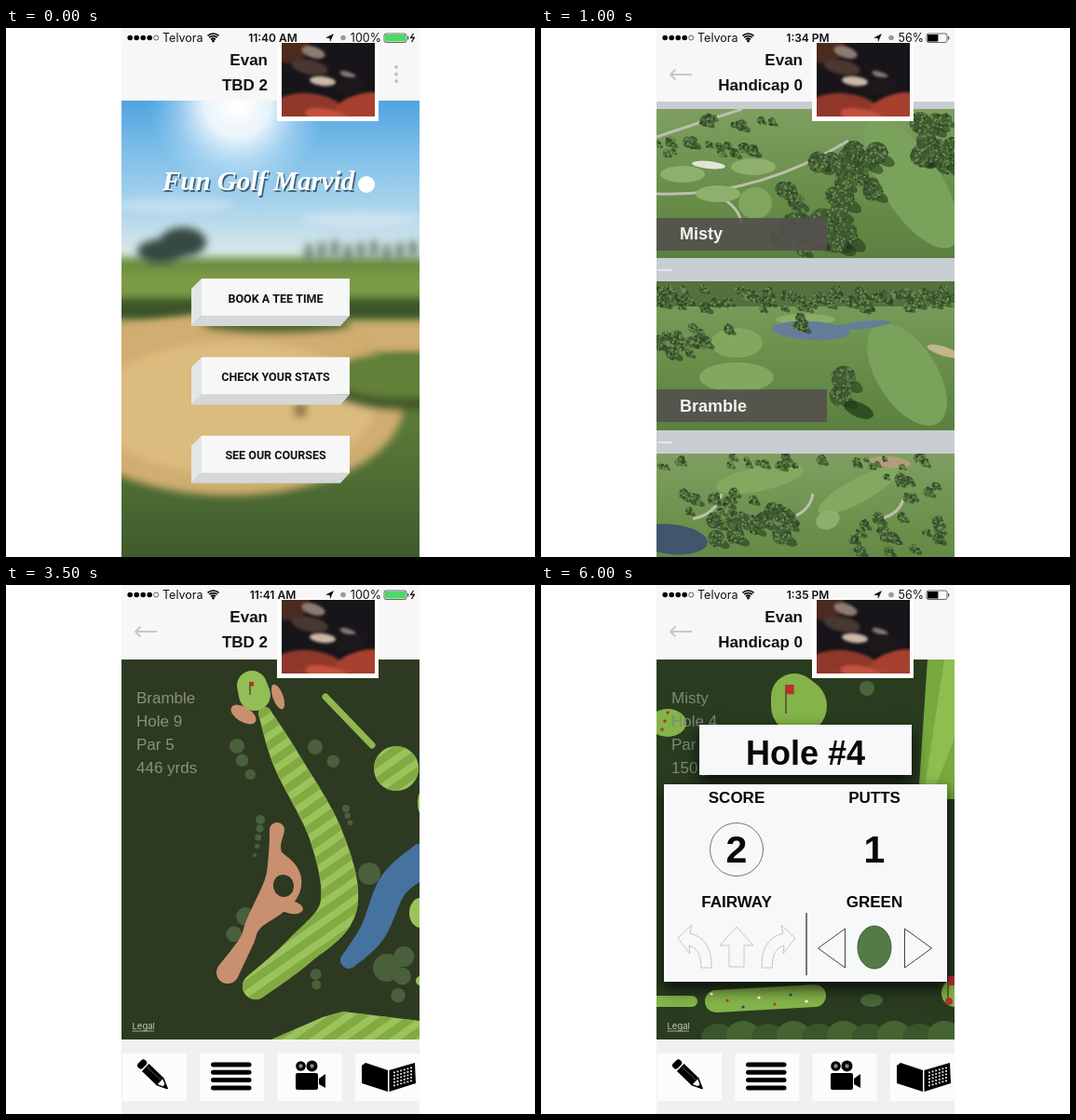
Animation, 568 px wide and 568 px high, one loop 8 s. Source, as an HTML page with a canvas:

```html
<!DOCTYPE html>
<html lang="en">
<head>
<meta charset="utf-8">
<title>Golf app tour</title>
<style>
html, body { margin: 0; width: 100%; height: 100%; overflow: hidden; background: #fff; }
canvas { display: block; width: 568px; height: 568px; }
</style>
</head>
<body>
<canvas id="stage" width="568" height="568"></canvas>
<script>
const SIZE = 568, LEFT = 124, WIDE = 320;
const SANS = '"Liberation Sans", Arial, sans-serif';
const UI = 'Inter, Roboto, sans-serif';
const BAR = '#f7f7f7', SAND = '#c99070', MAP = '#2d3a21', BUSH = '#4a5f3c';
const LIGHT = '#9cc35b', MOWN = '#82aa43', TURF = '#84b449', RED = '#b8322f';
const USER = 'Evan', CARRIER = 'Telvora', COURSES = ['Misty', 'Bramble'];
const stage = document.getElementById('stage').getContext('2d');
let c;

// ---- drawing helpers ----
function seeded(s) {
  return () => (s = (s * 16807) % 2147483647) / 2147483647;
}
function times(n, draw) {
  for (let i = 0; i < n; i++) draw(i);
}
function fill(color) {
  if (!color) return;
  c.fillStyle = color;
  c.fill();
}
function outline(color, width = 1) {
  c.strokeStyle = color;
  c.lineWidth = width;
  c.stroke();
}
function rect(x, y, w, h, color) { c.fillStyle = color; c.fillRect(x, y, w, h); }
function round(x, y, w, h, r, color) {
  c.beginPath();
  c.roundRect(x, y, w, h, r);
  fill(color);
}
function oval(x, y, rx, ry, color, rot = 0) {
  c.beginPath();
  c.ellipse(x, y, rx, ry, rot, 0, 7);
  fill(color);
}
function dot(x, y, r, color) { oval(x, y, r, r, color); }
function poly(p, color) {
  c.beginPath();
  for (let i = 0; i < p.length; i += 2) c.lineTo(p[i], p[i + 1]);
  c.closePath();
  fill(color);
}
function line(p, color, width = 1, cap = 'butt') {
  c.beginPath();
  for (let i = 0; i < p.length; i += 2) c.lineTo(p[i], p[i + 1]);
  c.lineCap = cap;
  c.lineJoin = 'round';
  outline(color, width);
}
function curve(x0, y0, cx, cy, x1, y1, color, width) {
  c.beginPath();
  c.moveTo(x0, y0);
  c.quadraticCurveTo(cx, cy, x1, y1);
  outline(color, width);
}
// Smooth band through key points [x, y, radius].
function ribbon(keys, color) {
  const key = i => keys[Math.max(0, Math.min(keys.length - 1, i))];
  c.beginPath();
  for (let u = 0; u <= keys.length - 1; u += 1 / 32) {
    const i = Math.floor(u), t = u - i;
    const [x, y, r] = key(i).map((b, d) => {
      const a = key(i - 1)[d], e = key(i + 1)[d], f = key(i + 2)[d];
      return b + t / 2 * (e - a + t * (2 * a - 5 * b + 4 * e - f + t * (3 * (b - e) + f - a)));
    });
    c.moveTo(x + r, y);
    c.arc(x, y, r, 0, 7);
  }
  fill(color);
}
// Fills the current path with diagonal mowing stripes.
function stripes() {
  c.save();
  fill(LIGHT);
  c.clip();
  times(45, i => line([100, i * 20, 500, i * 20 - 280], MOWN, 8.8));
  c.restore();
}
function text(s, x, y, font, color = '#111', align = 'left') {
  c.font = font;
  c.fillStyle = color;
  c.textAlign = align;
  c.fillText(s, x, y);
}
function inside(x, y, w, h, draw) {
  c.save();
  c.beginPath();
  c.rect(x, y, w, h);
  c.clip();
  draw();
  c.restore();
}
function ramp(y0, y1, ...colors) {
  const g = c.createLinearGradient(0, y0, 0, y1);
  colors.forEach((v, i) => g.addColorStop(i / (colors.length - 1), v));
  return g;
}

// ---- shared chrome ----
function statusBar(time, charge) {
  const full = charge === 100, arrow = full ? 348 : 362, bx = full ? 406 : 414, bw = full ? 24 : 22;
  times(4, i => dot(133.2 + i * 7, 10.5, 2.8, '#000'));
  dot(161.2, 10.5, 2.5);
  outline('#222', .7);
  text(CARRIER, 168, 15, '12.5px ' + UI);
  for (const r of [3.6, 6.4, 9]) {
    c.beginPath();
    c.arc(222.5, 15, r, -2.3, -.84);
    outline('#000', 1.7);
  }
  dot(222.5, 14, 1.4, '#000');
  text(time, 286.5, 15, '600 12px ' + UI, '#111', 'center');
  poly([arrow + 4, 6, arrow - 5, 10.5, arrow - .5, 11, arrow, 15], '#111');
  dot(arrow + 14, 10.5, 2.8, '#999');
  text(charge + '%', bx - 3, 15, '12.5px ' + UI, '#111', 'right');
  round(bx, 6, bw, 9.5, 2);
  outline('#444', .8);
  rect(bx + 1, 7, (bw - 2) * (full ? 1 : .57), 7.5, full ? '#4cd964' : '#000');
  rect(bx + bw + 1, 9, 1.3, 3.5, '#555');
  if (full) line([437.5, 6, 434.5, 10.5, 438.5, 10.2, 435.5, 15], '#111', 1.3);
}
function portrait(dx) {
  rect(291, 15, 109, 85, '#fff');
  inside(296, 16, 100, 79, () => {
    rect(296, 16, 100, 79, '#17151a');
    c.filter = 'blur(1.5px)';
    oval(304, 20, 22, 18, '#4c2a1e');
    oval(325, 98, 46, 28, '#8f382a', .1);
    oval(385, 88, 34, 18, '#a8402f', -.2);
    oval(345, 95, 24, 8, '#c4503d', .2);
    c.translate(dx, 0);
    oval(330, 26, 13, 6, '#8d7b72', .3);
    oval(326, 42, 20, 8, '#493732', .2);
    oval(340, 57, 14, 5, '#cbb9a6', .1);
    oval(367, 50, 9, 3, '#8b7972', .3);
    oval(370, 63, 16, 9, '#1d181c', -.2);
    c.filter = 'none';
  });
}
function header(time, charge, label, bottom, back = true) {
  rect(LEFT, 0, WIDE, bottom, BAR);
  statusBar(time, charge);
  text(USER, 281, 40, 'bold 17px ' + SANS, '#111', 'right');
  text(label, 281, 67, 'bold 17px ' + SANS, '#111', 'right');
  portrait(charge === 100 ? 0 : -3);
  if (back) {
    line([139, 50, 162, 50], '#c6c8ca', 2);
    line([144.5, 44.5, 139, 50, 144.5, 55.5], '#c6c8ca', 2);
  } else {
    times(3, i => dot(419, 42 + i * 7.5, 2, '#c4c4c4'));
  }
}
function pencil() {
  c.save();
  c.translate(158, 526);
  c.rotate(.77);
  round(-20, -5.5, 7, 11, 3, '#000');
  rect(-11.5, -5.5, 22, 11, '#000');
  line([-10, -1.7, 10, -1.7], '#777', .7);
  line([10, -5, 21, 0, 10, 5], '#000', 1.5);
  poly([16, -2.5, 22, 0, 16, 2.5], '#000');
  c.restore();
}
function movieCamera() {
  times(2, i => {
    dot(316.5 + i * 12, 516.5, 5.3 + i * .7, '#000');
    dot(316.5 + i * 12, 516.5, 2.2, '#888');
  });
  round(311, 524, 24, 18, 2, '#000');
  poly([336, 530, 343, 525, 343, 540, 336, 536], '#000');
}
function book() {
  poly([382, 516, 386, 513, 410, 521, 410, 544, 382, 535], '#000');
  poly([411.5, 521, 439, 513, 440, 535, 411.5, 544], '#000');
  times(30, i => rect(416 + i % 6 * 3.6, 522.5 + Math.floor(i / 6) * 3.5 - i % 6, 2, 1.8, '#ddd'));
}
function toolbar() {
  rect(LEFT, 488, WIDE, 80, '#f0f0f1');
  times(4, i => rect(125 + i * 83.3, 503, 69, 51, '#fcfcfc'));
  pencil();
  times(4, i => line([222.5, 515 + i * 8.3, 261, 515 + i * 8.3], '#000', 5, 'round'));
  movieCamera();
  book();
}
function holeInfo(color, ...lines) {
  lines.forEach((s, i) => text(s, 140, 127 + i * 25, '17px ' + SANS, color));
  text('Legal', 135.5, 477, '9.5px ' + UI, '#c3c8bd');
  line([135.5, 479, 159, 479], '#c3c8bd', .8);
}

// ---- home ----
function boxButton(y, label) {
  poly([210, y, 210, y + 40, 199, y + 51, 199, y + 11], '#e3e6e7');
  poly([210, y + 40, 369, y + 40, 359, y + 51, 199, y + 51], '#d3d8d9');
  rect(210, y, 159, 40, '#f8f7f8');
  text(label, 289.5, y + 25.5, '700 12.5px Roboto, sans-serif', '#111', 'center');
}
function scenery() {
  rect(LEFT, 78, WIDE, 172, ramp(78, 246, '#4fa4e0', '#7fbfe9', '#a9d3ec', '#dde9e8'));
  const sun = c.createRadialGradient(248, 82, 6, 248, 82, 95);
  ['#fff', 'rgba(255,255,255,.85)', 'rgba(235,246,255,.35)', 'rgba(200,230,255,0)']
    .forEach((v, i) => sun.addColorStop(i / 3, v));
  rect(LEFT, 78, WIDE, 172, sun);
  c.filter = 'blur(4px)';
  times(2, i => oval(180 + i * 200, 190 + i * 15, 65, 8, 'rgba(255,255,255,.28)'));
  rect(110, 246, 350, 340, ramp(246, 568, '#6f8f45', '#66883c', '#5c7d38', '#4e6d34', '#3f5b2b'));
  oval(165, 240, 24, 13, '#354941');
  oval(190, 230, 25, 16, '#354941');
  times(9, i => oval(325 + i * 14, 241 - i % 3 * 2, 4, 10, '#587060'));
  rect(110, 262, 350, 28, '#7c9b45');
  rect(110, 291, 350, 24, '#3b5429');
  rect(110, 314, 350, 36, '#d0ad70');
  oval(240, 404, 187, 98, '#d0ad70');
  oval(245, 408, 150, 72, '#dcbb7e');
  oval(290, 318, 80, 9, '#4a602f');
  oval(430, 382, 84, 28, '#405629');
  oval(430, 374, 84, 24, '#638139');
  oval(316, 410, 6, 8, '#816c45');
  c.filter = 'none';
}
function home() {
  inside(LEFT, 78, WIDE, 490, scenery);
  header('11:40 AM', 100, 'TBD 2', 78, false);
  const font = 'italic bold 29px "Liberation Serif", serif';
  text('Fun Golf Marvid', 169.5, 176, font, '#3d6076');
  text('Fun Golf Marvid', 168, 174, font, '#fff');
  dot(387, 168, 9, '#fff');
  ['BOOK A TEE TIME', 'CHECK YOUR STATS', 'SEE OUR COURSES']
    .forEach((s, i) => boxButton(269 + i * 84.4, s));
}

// ---- course list ----
function tree(x, y, r, rnd) {
  oval(x + r * .7, y + r * .6, r, r * .5, 'rgba(30,52,26,.55)', .5);
  dot(x, y, r, '#3f5b31');
  times(r * 4, () => {
    const a = rnd() * 7, d = Math.sqrt(rnd()) * r;
    dot(x + Math.cos(a) * d, y + Math.sin(a) * d, 1.2, ['#2f4826', '#557340', '#6f8d53'][Math.floor(rnd() * 3)]);
  });
}
function grove(x, y, w, h, n, r, rnd) {
  const spots = Array.from({ length: n }, () => [x + rnd() * w, y + rnd() * h, r * (.6 + rnd() * .7)]);
  spots.sort((a, b) => a[1] - b[1]).forEach(s => tree(...s, rnd));
}
function path(...p) { curve(...p, '#bdbfae', 3); }
const photos = [
  (y, rnd) => {
    path(124, y + 30, 165, y + 16, 216, y);
    path(124, y + 91, 230, y + 95, 330, y + 34);
    path(190, y + 93, 213, y + 105, 215, y + 123);
    oval(398, y + 80, 80, 32, '#7ba25b', 1);
    times(3, i => oval(152 + i * 38, y + 70 + i % 2 * 25 - i * 4, 24, 9, '#8eb06c'));
    oval(230, y + 101, 18, 17, '#7fa55f');
    oval(180, y + 60, 18, 4, '#e2e4d8', .1);
    grove(125, y + 35, 105, 18, 14, 5, rnd);
    grove(170, y + 8, 100, 10, 7, 5, rnd);
    grove(296, y + 40, 66, 52, 18, 10, rnd);
    grove(398, y + 8, 46, 52, 18, 10, rnd);
    grove(250, y + 82, 75, 75, 24, 12, rnd);
  },
  (y, rnd) => {
    rect(LEFT, y, WIDE, 27, '#55703f');
    grove(LEFT, y + 8, WIDE, 22, 80, 5, rnd);
    times(2, i => oval(210, y + 66 + i * 37, 28 + i * 12, 16, '#82a85f'));
    oval(284, y + 41, 32, 6, '#8aad66');
    oval(393, y + 100, 62, 32, '#7ba25b', 1);
    oval(290, y + 53, 42, 10, '#647d99', .05);
    oval(345, y + 47, 30, 4, '#647d99', -.1);
    oval(432, y + 75, 18, 5, '#c2b58c', .3);
    grove(126, y + 46, 50, 38, 13, 6, rnd);
    grove(200, y + 36, 130, 16, 4, 6, rnd);
    grove(318, y + 84, 10, 42, 4, 10, rnd);
    oval(341, y + 138, 17, 8, 'rgba(28,58,22,.7)', .4);
  },
  (y, rnd) => {
    times(2, i => oval(235 + i * 105, y + 27 + i * 13, 48, 13, '#82a95f', -.2 - i * .3));
    oval(308, y + 71, 13, 10, '#8cb06c', -.4);
    oval(375, y + 9, 22, 6, '#b39c7b', .1);
    times(3, i => path(163 + i * 100, y + 70, 188 + i * 100, y + 65, 194 + i * 98, y + 43));
    oval(140, y + 92, 39, 16, '#3f566c', .1);
    grove(LEFT, y + 3, WIDE, 12, 28, 4, rnd);
    grove(150, y + 40, 110, 30, 16, 5, rnd);
    grove(180, y + 60, 105, 40, 14, 8, rnd);
    grove(330, y + 20, 110, 85, 24, 5, rnd);
  }
];
function courses() {
  rect(LEFT, 79, WIDE, 489, '#c8cdd1');
  photos.forEach((draw, i) => {
    const y = 87 + i * 185;
    inside(LEFT, y, WIDE, 160, () => {
      rect(LEFT, y, WIDE, 160, ramp(y, y + 160, '#7e9f60', '#6a904b', '#5b8040'));
      draw(y, seeded(77 + i * 900));
    });
    if (i > 1) return;
    rect(LEFT, y + 117 - i, 183, 35, 'rgba(84,79,78,.88)');
    text(COURSES[i], 149, y + 140, 'bold 18px ' + SANS, '#f2f2f2');
    line([125, y + 173, 141, y + 173], '#eef0f1', 1.5);
  });
  header('1:34 PM', 56, 'Handicap 0', 79);
}

// ---- hole map ----
function flag(x, y, h) {
  line([x, y, x, y + h], '#4e3b26', 1.3);
  rect(x, y, h * .28, h * .33, RED);
}
function bushes(x, y, slope, n, r, rnd) {
  times(n, i => dot(x + i * slope + (rnd() - .5) * r, y + i * r * 1.9, r * (1 - i * .15), BUSH));
}
function layout() {
  const rnd = seeded(9);
  rect(LEFT, 80, WIDE, 408, MAP);
  bushes(252, 173, 4, 3, 8, rnd);
  bushes(335, 174, 14, 2, 8, rnd);
  bushes(363, 240, 4, 3, 4, rnd);
  bushes(275, 252, -2, 5, 5, rnd);
  bushes(259, 356, -14, 2, 10, rnd);
  bushes(331, 418, 5, 2, 6, rnd);
  bushes(432, 399, -6, 3, 11, rnd);
  dot(409, 411, 15, BUSH);
  dot(390, 310, 12, BUSH);
  ribbon([[278, 138, 7], [302, 190, 15], [344, 270, 18], [357, 345, 20], [316, 392, 17], [268, 431, 14]]);
  stripes();
  ribbon([[264, 108, 16], [267, 118, 17]], '#91be55');
  flag(262, 104, 14);
  oval(255, 139, 15, 8, SAND, .55);
  oval(292, 120, 5.5, 14, SAND, -.35);
  ribbon([[291, 263, 8], [289, 288, 7], [297, 322, 20], [267, 362, 9], [258, 383, 8], [238, 416, 12]], SAND);
  oval(306, 346, 13, 7, SAND, .2);
  oval(298, 323, 11, 12, MAP, -.3);
  line([343, 120, 393, 172], '#91b850', 7, 'round');
  dot(419, 197, 24);
  stripes();
  ribbon([[448, 295, 18], [416, 322, 16], [394, 372, 14], [368, 403, 9]], '#4672a0');
  times(3, i => oval(445, [234, 352, 425][i], [3, 12, 5][i], [11, 16, 5][i], LIGHT));
  poly([283, 489, 340, 464, 362, 458, 444, 468, 444, 489]);
  stripes();
}
function hole() {
  inside(LEFT, 80, WIDE, 408, layout);
  header('11:41 AM', 100, 'TBD 2', 80);
  holeInfo('#89917f', COURSES[1], 'Hole 9', 'Par 5', '446 yrds');
  toolbar();
}

// ---- score card ----
function card(x, y, w, h) {
  c.save();
  c.shadowColor = 'rgba(0,0,0,.8)';
  c.shadowBlur = 16;
  c.shadowOffsetY = 7;
  rect(x, y, w, h, '#f7f8fa');
  c.restore();
}
function bentArrow(side) {
  c.save();
  c.translate(210, 0);
  c.scale(side, 1);
  c.beginPath();
  c.moveTo(-63, 379);
  c.lineTo(-48, 365);
  c.lineTo(-50, 374);
  c.quadraticCurveTo(-26, 380, -27, 411);
  c.lineTo(-38, 411);
  c.quadraticCurveTo(-38, 390, -51, 387);
  c.lineTo(-50, 396);
  c.closePath();
  outline('#c6c6c6');
  c.restore();
}
function greenside() {
  rect(LEFT, 80, WIDE, 408, '#2a3c20');
  poly([415, 80, 444, 80, 444, 230, 405, 230], '#78a93f');
  poly([433, 80, 444, 80, 444, 165, 418, 230, 410, 230], '#8fbd4f');
  ribbon([[272, 120, 25], [277, 130, 30]], TURF);
  flag(263, 107, 31);
  dot(350, 111, 8, '#48663a');
  oval(136, 148, 20, 15, TURF);
  times(3, i => dot(136 - i * 3, 137 + i * 9, 1.8, RED));
  times(10, i => oval(190 + i * 27, 486 - i % 2 * 3, 18, 15, i % 2 ? '#45642f' : '#3b562a'));
  oval(355, 446, 12, 7, '#48663a');
  line([110, 447, 162, 447], TURF, 12, 'round');
  line([188, 447, 294, 441], TURF, 24, 'round');
  times(7, i => dot(183 + i * 17, 439 + i * 7 % 17, 1.6, ['#fff', RED, '#33475e'][i % 3]));
  oval(444, 438, 14, 15, TURF);
  flag(437, 420, 30);
  dot(438, 447, 4, RED);
}
function score() {
  inside(LEFT, 80, WIDE, 408, greenside);
  header('1:35 PM', 56, 'Handicap 0', 80);
  holeInfo('#7d8a73', COURSES[0], 'Hole 4', 'Par 3', '150 yrds');
  inside(LEFT, 100, WIDE, 388, () => {
    card(170, 150, 228, 54);
    card(132, 214, 304, 212);
  });
  const bold = (s, x, y, px) => text(s, x, y, `bold ${px}px ${SANS}`, '#080808', 'center');
  bold('Hole #4', 284, 193, 36);
  [['SCORE', '2', 'FAIRWAY'], ['PUTTS', '1', 'GREEN']].forEach(([top, value, below], i) => {
    const x = 210 + i * 148;
    bold(top, x, 234, 17);
    bold(value, x, 298, 41);
    bold(below, x, 346, 17);
  });
  dot(210, 284, 28.5);
  outline('#777');
  bentArrow(1);
  bentArrow(-1);
  poly([210, 367, 228, 387, 218, 387, 218, 410, 202, 410, 202, 387, 192, 387]);
  outline('#c6c6c6');
  line([285, 352, 285, 419], '#777', 2);
  for (const side of [-1, 1]) {
    const x = 358.5 + side * 32;
    poly([x + side * 29, 390, x, 369, x, 411]);
    outline('#444');
  }
  oval(358, 389, 18, 23, '#537b46');
  outline('#3d5e33');
  toolbar();
}

// ---- playback ----
const scenes = [home, courses, hole, score].map(draw => {
  const canvas = document.createElement('canvas');
  canvas.width = canvas.height = SIZE;
  c = canvas.getContext('2d');
  rect(0, 0, SIZE, SIZE, '#fff');
  draw();
  return canvas;
});
// Each fade: start, then how far the old view has left and the new one has come at the first step.
const fades = [[500, .17, .17], [3000, .28, .55], [5500, .17, .17]];

function show(index, alpha) {
  stage.globalAlpha = alpha;
  stage.drawImage(scenes[index], 0, 0);
}
function frame(now) {
  const t = now % 8000;
  let from = 0, gone = 0, come = 0;
  fades.forEach(([start, out, into], i) => {
    if (t < start) return;
    const k = Math.min(5, Math.floor((t - start) / 100)) / 5;
    from = i;
    gone = out + (1 - out) * k;
    come = into + (1 - into) * k;
  });
  stage.globalAlpha = 1;
  stage.fillStyle = '#fff';
  stage.fillRect(0, 0, SIZE, SIZE);
  if (come) show(from + 1, come);
  show(from, 1 - gone);
}
const begin = performance.now();
function tick() {
  frame(performance.now() - begin);
  requestAnimationFrame(tick);
}
tick();
</script>
</body>
</html>
```
